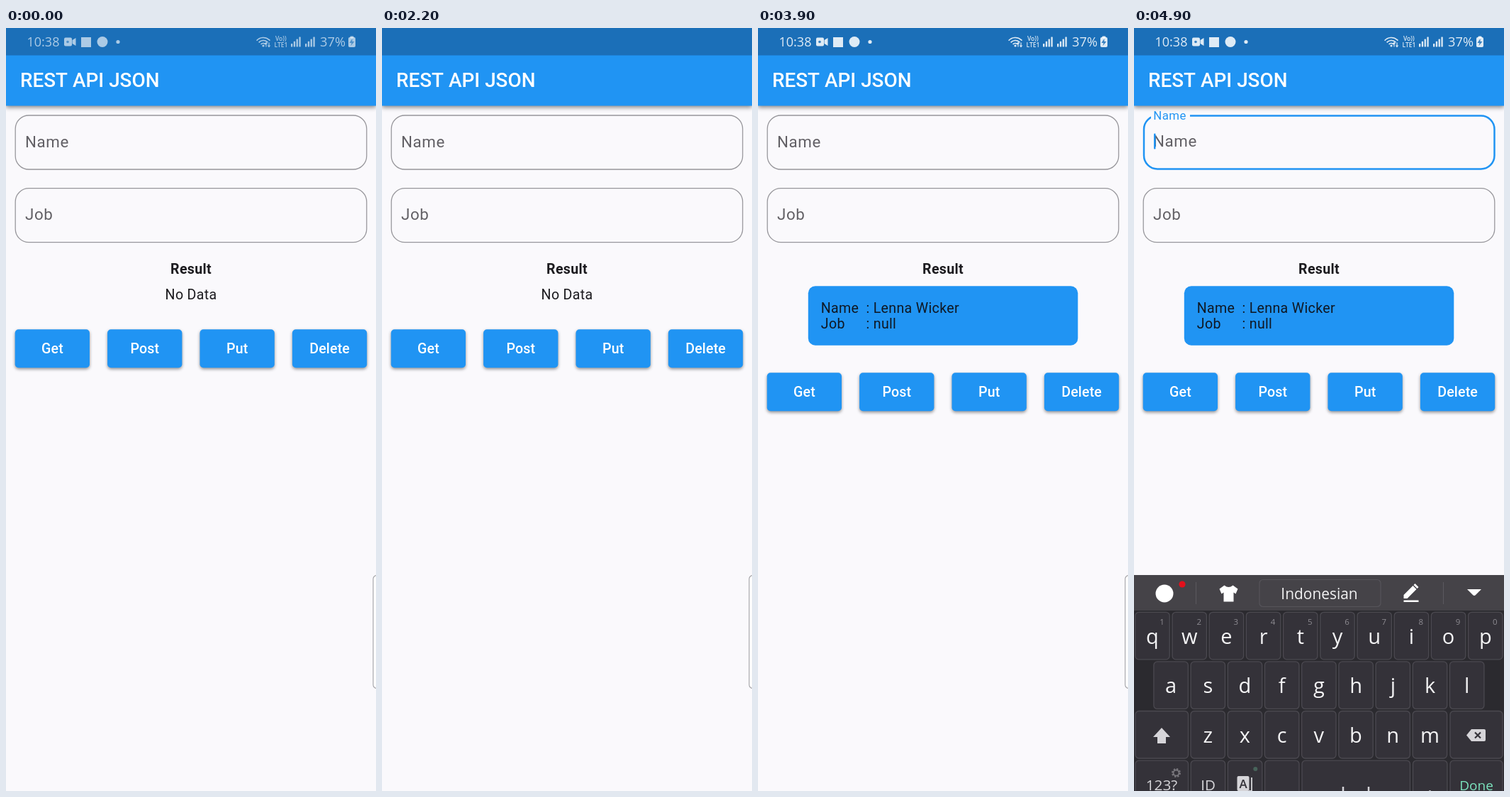
Animation of 522x1074 px, one loop 5100 ms. Source, as an HTML page with a canvas:

```html
<!DOCTYPE html>
<html lang="en">
<head>
<meta charset="utf-8">
<title>REST API JSON</title>
<style>
  html, body { margin: 0; width: 100%; height: 100%; overflow: hidden; background: #faf9fc; }
  canvas { display: block; width: 522px; height: 1074px; }
</style>
</head>
<body>
<canvas id="stage"></canvas>
<script>
const W = 522, H = 1074, LOOP = 5100, STEP = 100;
const BLUE = '#2094f3', INK = '#1c1b1f', PAGE = '#faf9fc';
const ROBOTO = 'Roboto, sans-serif', SYSTEM = '"Open Sans", sans-serif';
const canvas = document.getElementById('stage');
const ctx = canvas.getContext('2d');
const dpr = window.devicePixelRatio || 1;
canvas.width = W * dpr;
canvas.height = H * dpr;

const clamp = v => Math.max(0, Math.min(1, v));
const ramp = (t, a, b) => clamp((t - a) / (b - a));

function text(str, x, y, size, color, { weight = 400, family = ROBOTO, align = 'left', spacing = 0 } = {}) {
  ctx.font = `${weight} ${size}px ${family}`;
  ctx.letterSpacing = spacing + 'px';
  ctx.textAlign = align;
  ctx.fillStyle = color;
  ctx.fillText(str, x, y);
}

function box(x, y, w, h, r, fill, stroke, line = 1) {
  ctx.beginPath();
  ctx.roundRect(x, y, w, h, r);
  if (fill) { ctx.fillStyle = fill; ctx.fill(); }
  if (stroke) { ctx.strokeStyle = stroke; ctx.lineWidth = line; ctx.stroke(); }
}

function disc(x, y, r, fill) {
  ctx.beginPath();
  ctx.arc(x, y, r, 0, Math.PI * 2);
  ctx.fillStyle = fill;
  ctx.fill();
}

function shape(d, x, y, fill, stroke, line = 1) {
  ctx.save();
  ctx.translate(x, y);
  const path = new Path2D(d);
  if (fill) { ctx.fillStyle = fill; ctx.fill(path); }
  if (stroke) { ctx.strokeStyle = stroke; ctx.lineWidth = line; ctx.stroke(path); }
  ctx.restore();
}

function shadowed(color, blur, dy, draw) {
  ctx.save();
  ctx.shadowColor = color;
  ctx.shadowBlur = blur * dpr;
  ctx.shadowOffsetY = dy * dpr;
  draw();
  ctx.restore();
}

function statusIcons(alpha) {
  if (alpha <= 0) return;
  const c = '#fff';
  ctx.save();
  ctx.globalAlpha = alpha * 0.86;
  const sys = { family: SYSTEM };
  text('10:38', 29.5, 26, 18, c, sys);
  box(82, 13.5, 11, 12, 2, c);
  shape('M0 3L5 0V11L0 8Z', 93.5, 14, c);
  disc(87, 19.5, 1.8, '#1b6fb8');
  box(106, 13, 14, 14, 0, c);
  disc(136, 19.5, 7.5, c);
  disc(158, 19.5, 2.6, c);

  // wifi
  for (const r of [4.5, 8.5, 12.5]) {
    ctx.beginPath();
    ctx.arc(363, 26, r, -Math.PI * 0.77, -Math.PI * 0.23);
    ctx.strokeStyle = c;
    ctx.lineWidth = 1.7;
    ctx.stroke();
  }
  disc(363, 25, 1.6, c);
  shape('M0 6V0M-1.6 2L0 0L1.6 2M4 0V6M2.4 4L4 6L5.6 4', 367, 20.5, null, c, 1.2);

  text('Vo))', 380, 18, 8.5, c, { family: SYSTEM, weight: 600 });
  text('LTE1', 378.5, 27, 8.5, c, { family: SYSTEM, weight: 600 });
  for (const x of [402, 422]) {
    for (let i = 0; i < 4; i++) {
      const h = 4.5 + i * 3.2;
      box(x + i * 3.8, 26.5 - h, 2.3, h, 0.6, c);
    }
  }
  text('37%', 443, 26, 18.3, c, sys);
  box(485.5, 11.5, 5, 3, 1, c);
  box(483, 13, 10, 14, 2, c);
  shape('M5 0L1 6H4L3 10L8 4H5Z', 483.5, 15, '#1b6fb8');
  ctx.restore();
}

function micBadge(t) {
  const alpha = Math.min(ramp(t, 220, 500), 1 - ramp(t, 1900, 2200));
  if (alpha <= 0) return;
  const shift = Math.min(ramp(t, 400, 600), 1 - ramp(t, 1600, 1900));
  const x = 496 - 26 * shift, y = 18.5;
  ctx.save();
  ctx.globalAlpha = alpha;
  disc(x, y, 12.5, '#47b96b');
  box(x - 2.8, y - 8, 5.6, 10, 2.8, '#fff');
  shape('M-5 -1V0A5 5 0 0 0 5 0V-1M0 5V8M-3 7.6H3', x, y, null, '#fff', 1.4);
  ctx.restore();
}

function bars(t) {
  shadowed('rgba(0,0,0,.45)', 6, 2, () => {
    ctx.fillStyle = BLUE;
    ctx.fillRect(0, 38, W, 71.5);
  });
  ctx.fillStyle = '#1b6fb8';
  ctx.fillRect(0, 0, W, 38.5);
  text('REST API JSON', 20, 83, 27.9, '#fff', { weight: 500 });
  statusIcons(t < 1000 ? 0.74 * (1 - ramp(t, 0, 250)) : ramp(t, 2400, 3000));
  micBadge(t);
}

function field(label, y, focused) {
  const hint = { spacing: 0.63 };
  if (focused) {
    ctx.save();
    ctx.beginPath();
    ctx.rect(0, y - 5, W, 90);
    ctx.rect(24, y - 5, 55, 14);
    ctx.clip('evenodd');
    box(14, y + 1, 494.5, 75, 19, null, BLUE, 2.5);
    ctx.restore();
    text(label, 27.2, y + 6, 16.8, BLUE, { spacing: 0.47 });
    text(label, 27, y + 44, 22.35, '#626065', hint);
    box(28, y + 26, 2.5, 22, 1, BLUE);
  } else {
    box(13.2, y + 0.5, 495.6, 76, 19, null, '#97969b', 1.27);
    text(label, 27, y + 45, 22.35, '#626065', hint);
  }
}

function buttons(y) {
  ['Get', 'Post', 'Put', 'Delete'].forEach((label, i) => {
    const x = 12.7 + i * 130.4;
    shadowed('rgba(0,0,0,.42)', 4, 2, () => box(x, y, 105.3, 54, 5, BLUE));
    text(label, x + 52.7, y + 33.5, 19.6, '#fff', { weight: 500, align: 'center', spacing: 0.13 });
  });
}

function result(loaded) {
  const body = { spacing: 0.32 };
  const mid = { spacing: 0.32, align: 'center' };
  text('Result', 261, 345.5, 19.6, INK, { ...mid, weight: 700 });
  if (!loaded) {
    text('No Data', 261, 381.5, 19.6, INK, mid);
    return;
  }
  box(70.8, 363.3, 380.5, 83.4, 10, BLUE);
  const dark = '#0f1824';
  [['Name', 'Lenna Wicker'], ['Job', 'null']].forEach(([key, value], i) => {
    const y = 400.5 + i * 22.7;
    text(key, 88.8, y, 19.6, dark, body);
    text(': ' + value, 152.5, y, 19.6, dark, body);
  });
}

function key(x, y, w) {
  box(x, y, w, 66.5, 5, '#343239', '#4b4950', 1.3);
}

function toolbar() {
  ctx.fillStyle = '#454348';
  ctx.fillRect(0, 0, W, 50);
  disc(43, 26, 12.5, '#fff');
  disc(68, 13, 4.6, '#e3101c');
  for (const x of [87, 436]) {
    ctx.fillStyle = '#5b595f';
    ctx.fillRect(x, 10, 1, 31);
  }
  shape('M-6 -11Q0 -6 6 -11L13 -6L10 1L7 -1V12H-7V-1L-10 1L-13 -6Z', 133.5, 25.5, '#fff');
  box(177, 6.5, 171, 38, 5, null, '#56545a', 1.2);
  text('Indonesian', 261.5, 33.5, 20.9, '#f2f2f3', { family: SYSTEM, align: 'center' });
  shape('M-10 8V3L3 -10L8 -5L-5 8ZM4 -11L6 -13L11 -8L9 -6ZM-10 10.5H11V13H-10Z', 390.5, 25, '#fff');
  shape('M-10 -4H10L2 4Q0 6 -2 4Z', 480, 24, '#fff');
}

function keyboard(top) {
  const sys = { family: SYSTEM, align: 'center' };
  const pitch = 52.2, rowPitch = 69.6, light = '#d6d5d9';
  ctx.save();
  ctx.translate(0, top);
  ctx.fillStyle = '#2b2a2f';
  ctx.fillRect(0, 0, W, H - top);
  toolbar();

  ['qwertyuiop', 'asdfghjkl', 'zxcvbnm'].forEach((row, r) => {
    const start = 26 + r * 26.1 + (r === 2 ? 26 : 0);
    const y = 52.3 + r * rowPitch;
    [...row].forEach((ch, i) => {
      const x = start + i * pitch;
      key(x - 24.2, y, 48.4);
      text(ch, x, y + 44.5, 29, '#f5f5f6', sys);
      if (r === 0) text(String((i + 1) % 10), x + 13.5, y + 17.5, 11.5, '#8d8b91', sys);
    });
  });

  const third = 52.3 + 2 * rowPitch, last = third + rowPitch;
  key(2, third, 74.5);
  key(446, third, 74);
  shape('M0 -12L12 1H6V10H-6V1H-12Z', 39, 227, light);
  shape('M-14 0L-7 -8.5H11Q13 -8.5 13 -6.5V6.5Q13 8.5 11 8.5H-7Z', 483, 225.5, light);
  shape('M-2 -4L6 4M6 -4L-2 4', 483, 225.5, null, '#343239', 2.2);

  for (const [x, w] of [[2, 74.5], [80.2, 48.4], [132.4, 48.4], [184.6, 48.4], [237, 152.5], [393.5, 48.4], [446, 74]]) {
    key(x, last, w);
  }
  text('123?', 39, 303, 20.8, light, sys);
  text('ID', 104.5, 303, 20.5, light, sys);

  // gear
  ctx.setLineDash([2.2, 1.7]);
  shape('M5 0A5 5 0 1 1 -5 0A5 5 0 1 1 5 0', 59.5, 278.5, null, '#77757b', 3);
  ctx.setLineDash([]);
  shape('M4 0A4 4 0 1 1 -4 0A4 4 0 1 1 4 0', 59.5, 278.5, null, '#77757b', 1.8);

  box(145.5, 283, 17, 21, 2, light);
  text('A', 154, 300, 17, '#343239', { ...sys, weight: 600 });
  shape('M0 0V19H-4', 166, 285, null, light, 1.8);
  disc(171.3, 273, 3, '#47635a');
  shape('M-18 -5V3H18V-5', 313, 303, null, light, 2.5);
  disc(417.5, 304.5, 1.6, light);
  text('Done', 483, 303, 19, '#7be3bd', sys);
  ctx.restore();
}

function draw(t) {
  const loaded = t >= 2300, typing = t >= 4200;
  ctx.setTransform(dpr, 0, 0, dpr, 0, 0);
  ctx.fillStyle = PAGE;
  ctx.fillRect(0, 0, W, H);
  bars(t);
  field('Name', 122.5, typing);
  field('Job', 225.2, false);
  result(loaded);
  buttons(loaded ? 485.2 : 424.2);
  if (typing) {
    keyboard(Math.round(770 + 47 * (1 - ramp(t, 4200, 4700)) ** 3));
  } else {
    box(518, 770.5, 20, 159, 5, '#fdfdfd', '#a9a8ac', 1.2);
  }
}

function tick(now) {
  draw(Math.floor((now % LOOP) / STEP) * STEP);
  requestAnimationFrame(tick);
}
requestAnimationFrame(tick);
</script>
</body>
</html>
```
